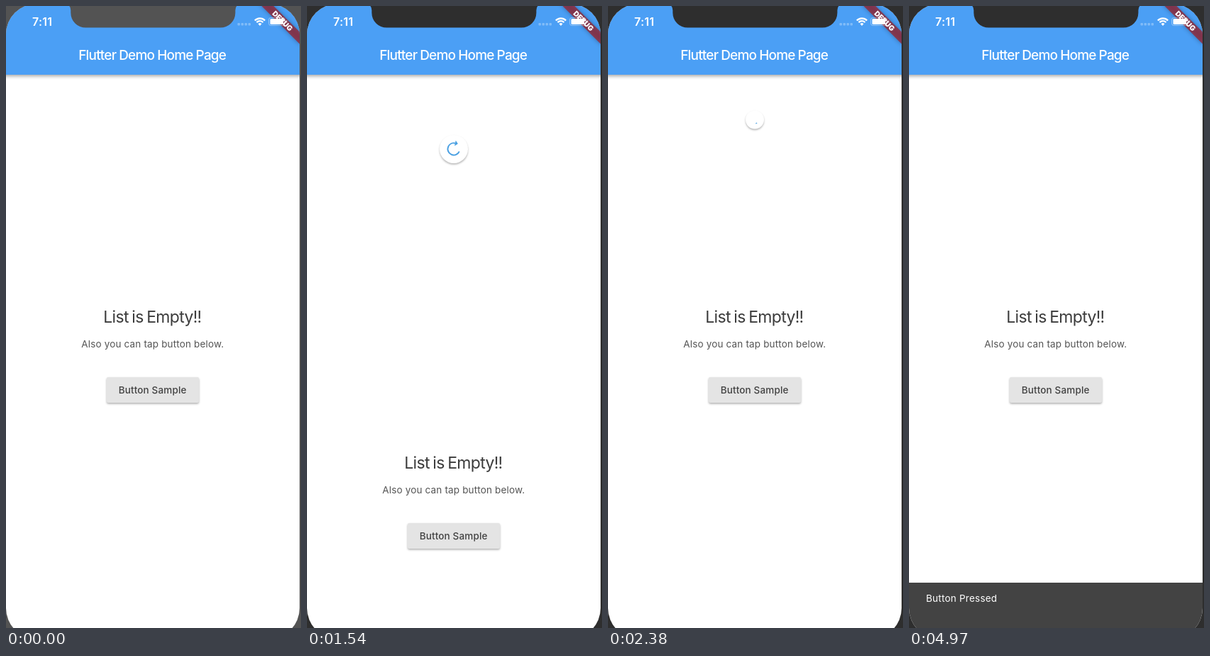
These frames come from a looping animation (416x878 px, 5.39 s). An HTML page with a canvas:

```html
<!DOCTYPE html>
<html lang="en">
<head>
<meta charset="utf-8">
<title>Pull to refresh</title>
<style>
  html, body { margin: 0; width: 100%; height: 100%; overflow: hidden; background: #2e2e2e; }
  canvas { display: block; width: 416px; height: 878px; }
</style>
</head>
<body>
<canvas id="stage" width="416" height="878"></canvas>
<script>
const ctx = document.getElementById('stage').getContext('2d');
const LOOP = 5390, STEP = 70;
const MID = 207, BAR_BOTTOM = 97;
const RELEASE = 1567, SNAP_START = 1530, SPIN_START = 1676;
const SHRINK_START = 2310, SHRINK_TIME = 200;
const MAX_PULL = 209, PULL_LIMIT = 196.5;
const BLUE = '#4b9ff5';

const clamp = (x, lo = 0, hi = 1) => Math.min(hi, Math.max(lo, x));
const mix = (a, b, k) => a + (b - a) * k;
const progress = (t, start, length) => clamp((t - start) / length);
const smooth = k => k * k * (3 - 2 * k);

// Cubic bezier easing (0.4, 0, 0.2, 1), solved by bisection.
function fastOutSlowIn(x) {
  if (x <= 0 || x >= 1) return clamp(x);
  let lo = 0, hi = 1, s = 0.5;
  for (let i = 0; i < 24; i++) {
    s = (lo + hi) / 2;
    const bx = 1.2 * s * (1 - s) ** 2 + 0.6 * s * s * (1 - s) + s ** 3;
    if (bx < x) lo = s; else hi = s;
  }
  return 3 * s * s * (1 - s) + s ** 3;
}

// Overscroll distance: finger drag, then an overdamped spring back.
function pullOffset(t) {
  if (t <= 700) return 176 * smooth(progress(t, 215, 485));
  if (t < 910) return 176;
  if (t < 1470) return mix(184.5, MAX_PULL, progress(t, 910, 280));
  if (t < RELEASE) return mix(MAX_PULL, MAX_PULL - 3, progress(t, 1400, 140));
  const s = (t - RELEASE) / 1000, slow = 9.08, fast = 22.02;
  const x = MAX_PULL * (fast * Math.exp(-slow * s) - slow * Math.exp(-fast * s)) / (fast - slow);
  return t >= 2520 ? 0 : x;
}

function shadow(color, blur, y) {
  ctx.shadowColor = color;
  ctx.shadowBlur = blur;
  ctx.shadowOffsetY = y;
}

function scoped(draw) {
  ctx.save();
  draw();
  ctx.restore();
}

function text(str, x, y, size, weight, color, { spacing = 0, word = 0, align = 'center' } = {}) {
  ctx.font = `${weight} ${size}px Inter, Roboto, sans-serif`;
  ctx.letterSpacing = spacing + 'px';
  ctx.wordSpacing = word + 'px';
  ctx.textAlign = align;
  ctx.textBaseline = 'alphabetic';
  ctx.fillStyle = color;
  ctx.fillText(str, x, y);
}

function roundRect(x, y, w, h, r) {
  ctx.beginPath();
  ctx.roundRect(x, y, w, h, r);
}

function drawContent(t) {
  const y = Math.round(pullOffset(t));
  text('List is Empty!!', MID - 0.6, 447 + y, 23, 400, '#3c3c3c', { spacing: -0.7, word: -1.2 });
  text('Also you can tap button below.', MID - 0.2, 482 + y, 13.5, 400, '#545454', { spacing: 0.16 });
  const press = progress(t, 3780, 210) * (1 - progress(t, 4200, 210));
  const shade = Math.round(mix(228, 222, press));
  scoped(() => {
    shadow('rgba(0,0,0,.33)', 3, 1.4);
    ctx.fillStyle = `rgb(${shade},${shade},${shade})`;
    roundRect(142, 524 + y, 130, 36, 2);
    ctx.fill();
  });
  text('Button Sample', MID - 0.4, 546.5 + y, 13.5, 500, '#414141', { spacing: 0.15 });
}

function drawArrowhead(r, angle, scale) {
  const ux = Math.cos(angle), uy = Math.sin(angle), half = 4 * scale;
  ctx.beginPath();
  ctx.moveTo(ux * r - uy * half, uy * r + ux * half);
  ctx.lineTo(ux * (r - half), uy * (r - half));
  ctx.lineTo(ux * (r + half), uy * (r + half));
  ctx.fill();
}

function drawSpinner(t) {
  if (t < 280 || t >= SHRINK_START + SHRINK_TIME) return;
  const pulled = clamp(1.5 * pullOffset(t) / PULL_LIMIT, 0, 1.5);
  const spinning = t >= SPIN_START;
  const snap = smooth(progress(t, SNAP_START, SPIN_START - SNAP_START));
  const reach = t < SNAP_START ? pulled : mix(1.5, 1, snap);
  const scale = 1 - progress(t, SHRINK_START, SHRINK_TIME);
  const cycle = spinning ? (0.25 + (t - SPIN_START) / 1200) % 1 : reach / 4;

  const head = fastOutSlowIn(clamp(cycle * 2)) * 1.5 * Math.PI;
  const tail = fastOutSlowIn(clamp(cycle * 2 - 1)) * 1.5 * Math.PI;
  const base = -Math.PI / 2 + cycle * 1.7 * Math.PI;
  const radius = 8.5;

  scoped(() => {
    ctx.beginPath();
    ctx.rect(0, BAR_BOTTOM, 414, 300);
    ctx.clip();
    ctx.translate(MID, BAR_BOTTOM + 84 * reach - 20.5);
    ctx.scale(scale, scale);
    scoped(() => {
      shadow('rgba(0,0,0,.28)', 2.5, 1.8);
      ctx.fillStyle = '#fff';
      ctx.beginPath();
      ctx.arc(0, 0, 20, 0, 2 * Math.PI);
      ctx.fill();
    });
    ctx.globalAlpha = clamp(reach);
    ctx.strokeStyle = ctx.fillStyle = '#4aa0e2';
    ctx.lineWidth = 2;
    ctx.beginPath();
    ctx.arc(0, 0, radius, base + tail, base + Math.max(head, tail + 0.01));
    ctx.stroke();
    if (!spinning) drawArrowhead(radius, base + head, clamp(reach));
  });
}

function drawAppBar() {
  scoped(() => {
    shadow('rgba(0,0,0,.36)', 5, 2);
    ctx.fillStyle = BLUE;
    ctx.fillRect(-10, -20, 440, BAR_BOTTOM + 20);
  });
  text('Flutter Demo Home Page', MID - 0.8, 76, 19, 500, '#fff', { spacing: -0.8, word: -0.3 });
}

function drawBanner() {
  scoped(() => {
    ctx.translate(414, -3);
    ctx.rotate(Math.PI / 4);
    scoped(() => {
      shadow('rgba(0,0,0,.45)', 6, 0);
      ctx.fillStyle = 'rgba(160,28,36,.7)';
      ctx.fillRect(-40, 28, 80, 12);
    });
    text('DEBUG', 0, 37.7, 10.2, 900, '#fff');
  });
}

function drawStatus() {
  text('7:11', 37, 27.5, 16, 600, '#fff', { spacing: 0.2, align: 'left' });
  ctx.fillStyle = 'rgba(255,255,255,.3)';
  for (let i = 0; i < 4; i++) {
    roundRect(326.5 + i * 5, 24, 3.5, 3.5, 1);
    ctx.fill();
  }
  // Wi-Fi fan
  ctx.strokeStyle = ctx.fillStyle = '#fff';
  ctx.lineWidth = 2.3;
  for (const r of [10, 6.3]) {
    ctx.beginPath();
    ctx.arc(358, 27.5, r, -Math.PI * 0.755, -Math.PI * 0.245);
    ctx.stroke();
  }
  ctx.beginPath();
  ctx.moveTo(358, 28);
  ctx.arc(358, 27.5, 3.4, -Math.PI * 0.755, -Math.PI * 0.245);
  ctx.fill();
  // Battery
  ctx.lineWidth = 1;
  ctx.strokeStyle = 'rgba(255,255,255,.4)';
  roundRect(370.5, 16.5, 23, 11, 3);
  ctx.stroke();
  roundRect(372.5, 18, 18.5, 8, 1.5);
  ctx.fill();
  ctx.fillStyle = 'rgba(255,255,255,.45)';
  roundRect(395, 20, 1.5, 4, 1);
  ctx.fill();
}

function drawSnackbar(t) {
  if (t < 4060) return;
  const rise = t >= 4270 ? 1 : fastOutSlowIn(progress(t, 4051, 250));
  const top = Math.round(mix(893, 814, rise));
  ctx.fillStyle = '#434343';
  ctx.fillRect(0, top, 414, 893 - top);
  const fade = progress(t, 4200, 190);
  if (fade > 0) {
    text('Button Pressed', 24, top + 27, 13.5, 400, `rgba(255,255,255,${fade})`,
      { spacing: 0.23, align: 'left' });
  }
}

function drawNotch(color) {
  const left = 91.3, right = 323.4, bottom = 30.6, r = 21;
  ctx.fillStyle = color;
  ctx.beginPath();
  ctx.moveTo(left - 4, -1);
  ctx.quadraticCurveTo(left, 0, left, 6);
  ctx.arcTo(left, bottom, left + r, bottom, r);
  ctx.arcTo(right, bottom, right, 6, r);
  ctx.lineTo(right, 6);
  ctx.quadraticCurveTo(right, 0, right + 4, -1);
  ctx.fill();
}

function draw(t) {
  const bezel = t < 280 ? '#535353' : '#2e2e2e';
  ctx.fillStyle = bezel;
  ctx.fillRect(0, 0, 416, 878);
  scoped(() => {
    roundRect(0, -3, 414, 896, 43);
    ctx.clip();
    ctx.fillStyle = '#fff';
    ctx.fillRect(0, -3, 414, 896);
    drawContent(t);
    drawSpinner(t);
    drawAppBar();
    drawSnackbar(t);
    drawBanner();
    drawStatus();
    drawNotch(bezel);
  });
}

const start = performance.now();
function tick() {
  const t = (performance.now() - start) % LOOP;
  draw(Math.floor(t / STEP) * STEP);
  requestAnimationFrame(tick);
}
tick();
</script>
</body>
</html>
```
